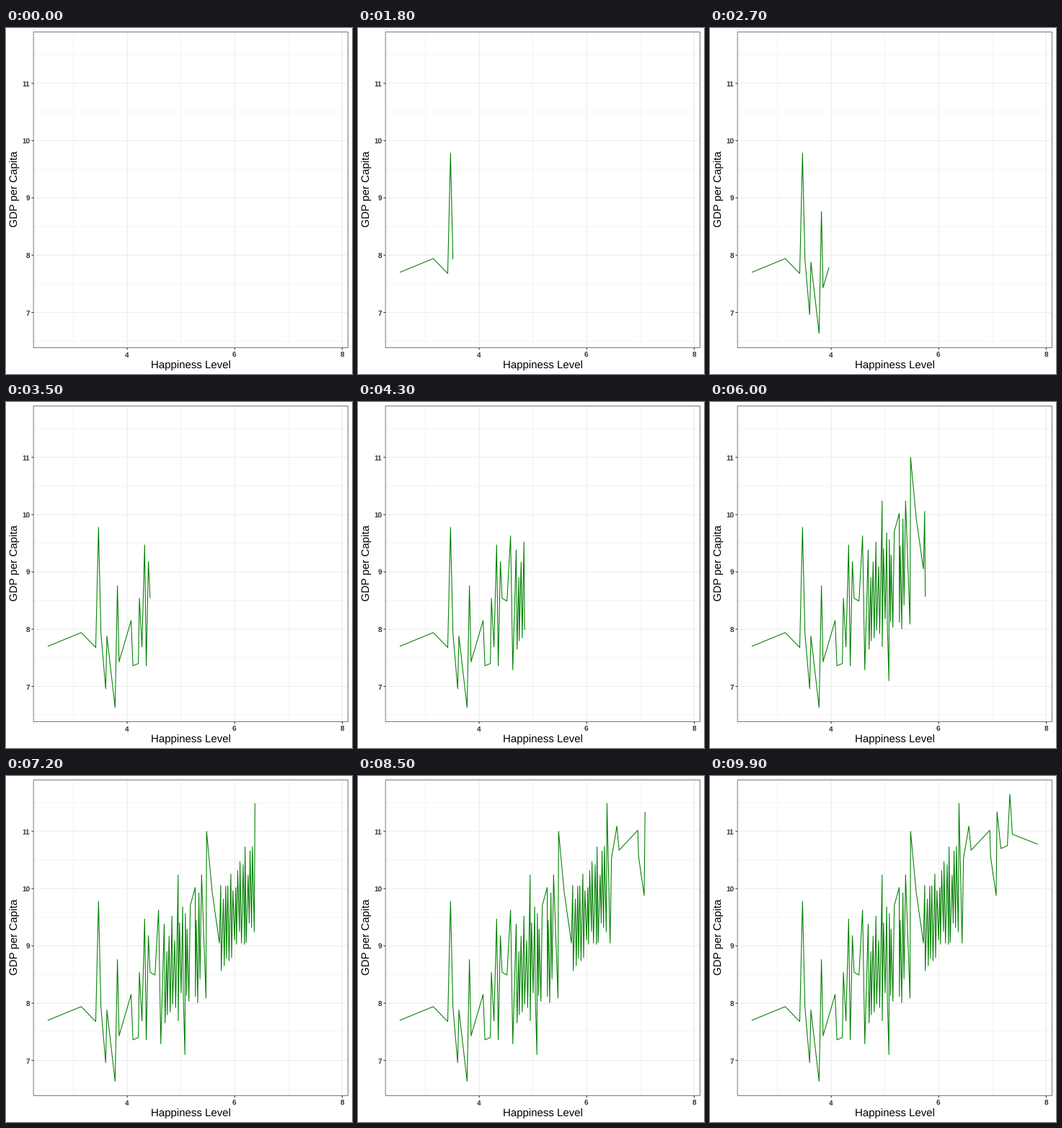
Recreate the animation shown at these times as a matplotlib script. Size 480 by 480 pixels, loop 10000 ms.

```python
import numpy as np
import matplotlib.pyplot as plt
from matplotlib.animation import FuncAnimation
from matplotlib.patches import Rectangle

SIZE, DPI, FRAMES = 480, 100, 100
PT = 72 / DPI  # points per pixel
LEFT, RIGHT, TOP, BOTTOM = 38.1, 474.5, 5.5, 443.5
STROKE = 1.07
INK, GRID, GREEN = "#333333", "#EBEBEB", "#008000"

# Main turning points of the curve: happiness, log GDP
KEYS = [
    (2.523, 7.70), (3.145, 7.94), (3.415, 7.68), (3.467, 9.78), (3.512, 7.93),
    (3.60, 6.96), (3.623, 7.88), (3.775, 6.635), (3.819, 8.76), (3.849, 7.43),
    (4.073, 8.15), (4.107, 7.36), (4.208, 7.40), (4.227, 8.54), (4.275, 7.69),
    (4.325, 9.47), (4.355, 7.36), (4.395, 9.18), (4.426, 8.54), (4.517, 8.49),
    (4.584, 9.63), (4.625, 7.29), (4.948, 10.24), (5.074, 7.10), (5.266, 10.02),
    (5.269, 8.12), (5.384, 10.24), (5.466, 8.09), (5.477, 11.0), (5.581, 9.94),
    (5.716, 9.05), (6.377, 11.49), (6.435, 9.05), (6.461, 10.53), (6.561, 11.09),
    (6.602, 10.67), (6.951, 11.02), (6.965, 10.56), (7.069, 9.88), (7.085, 11.34),
    (7.157, 10.7), (7.277, 10.75), (7.324, 11.647), (7.37, 10.95), (7.842, 10.775),
]

rng = np.random.default_rng(4)


def zigzag(start, end, count):
    """Swing up and down around the rising trend at uneven steps."""
    gap = (end - start) / (count - 1)
    x = np.linspace(start, end, count) + rng.uniform(-0.4, 0.4, count) * gap
    swing = rng.uniform(0.35, 1.0, count) * (-1.0) ** np.arange(count)
    return np.column_stack([x, 8.7 + 0.9 * (x - 5) + swing])


points = np.vstack([KEYS, zigzag(4.68, 5.17, 21), zigzag(5.29, 5.36, 4),
                    zigzag(5.735, 6.36, 28)])
score, gdp = points[points[:, 0].argsort()].T


def scaler(values, start, end):
    """Map data to pixels with a 5% margin on both sides."""
    lo, hi = values.min(), values.max()
    pad = 0.05 * (hi - lo)
    return lambda v: start + (v - lo + pad) / (hi - lo + 2 * pad) * (end - start)


to_x = scaler(score, LEFT, RIGHT)
to_y = scaler(gdp, BOTTOM, TOP)
xs, ys = to_x(score), to_y(gdp)

# Step at which each point is reached
steps = np.rint((FRAMES - 1) * (score - score[0]) / np.ptp(score)).astype(int)

plt.rcParams.update({"font.family": "Liberation Sans", "text.hinting": "none",
                     "path.simplify": False})
fig = plt.figure(figsize=(SIZE / DPI, SIZE / DPI), dpi=DPI, facecolor="white")
ax = fig.add_axes([0, 0, 1, 1])
ax.set(xlim=(0, SIZE), ylim=(SIZE, 0))
ax.axis("off")


def stroke(x, y, color, width=STROKE, z=1):
    return ax.plot(x, y, color=color, lw=width * PT, zorder=z, snap=False,
                   solid_capstyle="butt", solid_joinstyle="round")[0]


def label(x, y, text, size, color="black", ha="center", **style):
    ax.text(x, y, text, fontsize=size * PT, color=color, ha=ha, va="baseline",
            **style)


def grid_x(v, width=STROKE):
    stroke([to_x(v)] * 2, [TOP, BOTTOM], GRID, width)


def grid_y(v, width=STROKE):
    stroke([LEFT, RIGHT], [to_y(v)] * 2, GRID, width)


for v in (3, 5, 7):
    grid_x(v, STROKE / 2)
for v in np.arange(6.5, 12):
    grid_y(v, STROKE / 2)

for v in (4, 6, 8):
    x = to_x(v)
    grid_x(v)
    stroke([x, x], [BOTTOM, BOTTOM + 2.75], INK)
    label(x - 0.4, 456.6, str(v), 10, INK, weight="bold")
for v in range(7, 12):
    y = to_y(v)
    grid_y(v)
    stroke([LEFT - 2.75, LEFT], [y, y], INK)
    label(33.2, y + 4.4, str(v), 10, INK, ha="right", weight="bold")

ax.add_patch(Rectangle((LEFT, TOP), RIGHT - LEFT, BOTTOM - TOP, fill=False,
                       ec=INK, lw=0.65 * PT, zorder=4, snap=False))
label((LEFT + RIGHT) / 2, 472, "Happiness Level", 15)
label(16, (TOP + BOTTOM) / 2 - 1, "GDP per Capita", 15, rotation=90,
      rotation_mode="anchor")

curve = stroke([], [], GREEN, z=3)


def draw(i):
    n = np.searchsorted(steps, i, side="right")
    x, y = xs[:n], ys[:n]
    if steps[n - 1] < i:  # tip on its way to the next point
        t = (i - steps[n - 1]) / (steps[n] - steps[n - 1])
        x = np.append(x, x[-1] + t * (xs[n] - x[-1]))
        y = np.append(y, y[-1] + t * (ys[n] - y[-1]))
    curve.set_data(x, y)
    return curve,


anim = FuncAnimation(fig, draw, frames=FRAMES, interval=100, repeat=True,
                     repeat_delay=0)
plt.show()
```
